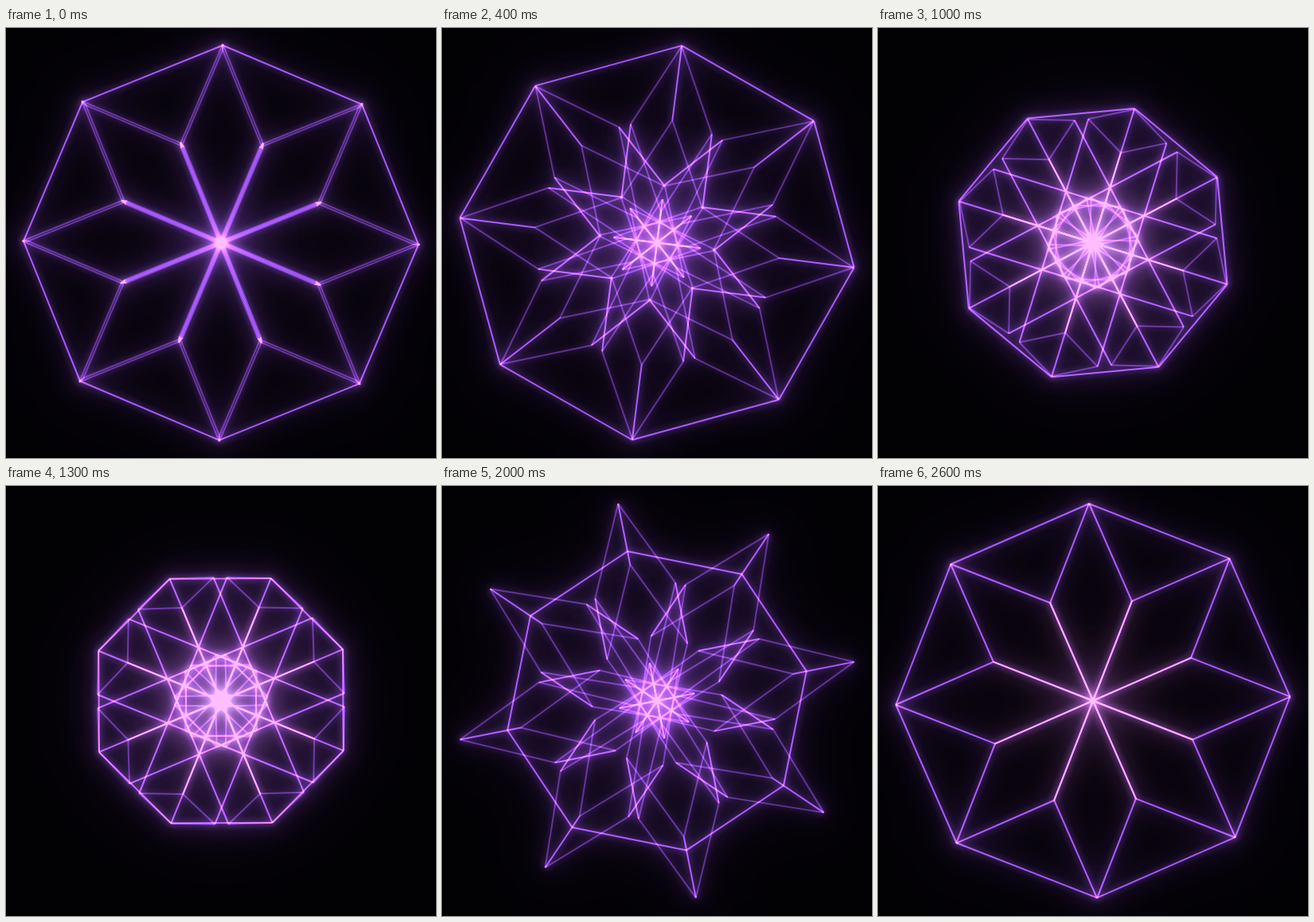
An HTML page with a canvas for the animation above (2.7 s loop, 540 by 540 pixels).

```html
<!DOCTYPE html>
<html lang="en">
<head>
<meta charset="utf-8">
<title>Turning ring</title>
<style>
html, body { margin: 0; width: 100%; height: 100%; overflow: hidden; background: #020104; }
canvas { display: block; }
</style>
</head>
<body>
<canvas id="stage" width="540" height="540"></canvas>
<script>
const LOOP = 2700, STEP = 100, COPIES = 8;
const CX = 270, CY = 269.7;
const REACH = 124, HALF_DEPTH = 88, HALF_WIDTH = REACH * Math.tan(Math.PI / 8);
const RAD = Math.PI / 180;

// [ms, degrees] and [ms, radius]
const TILT = [[0, 2.4], [400, 32.3], [1000, 76.7], [1300, 99.2], [1700, 132.8],
  [2200, 166.2], [2400, 174.5], [2600, 180], [2700, 182.4]];
const RIM = [[0, 248], [200, 253], [400, 249.5], [700, 221], [1000, 176.5],
  [1300, 166], [1700, 170], [2200, 209], [2600, 247.5], [2700, 248]];

const stage = document.getElementById("stage").getContext("2d");
const layer = document.createElement("canvas");
layer.width = layer.height = 540;
const pen = layer.getContext("2d");

// Smooth curve through unevenly spaced keys.
function curve(keys, t) {
  let i = 0;
  while (i < keys.length - 2 && t >= keys[i + 1][0]) i++;
  const slope = k => {
    const a = keys[Math.max(k - 1, 0)], b = keys[Math.min(k + 1, keys.length - 1)];
    return (b[1] - a[1]) / (b[0] - a[0]);
  };
  const [t0, v0] = keys[i], [t1, v1] = keys[i + 1];
  const span = t1 - t0, u = (t - t0) / span, u2 = u * u, u3 = u2 * u;
  return v0 * (2 * u3 - 3 * u2 + 1) + v1 * (3 * u2 - 2 * u3) +
    span * (slope(i) * (u3 - 2 * u2 + u) + slope(i + 1) * (u3 - u2));
}

function line(a, b, alpha) {
  pen.strokeStyle = `rgba(158, 84, 240, ${alpha})`;
  pen.beginPath();
  pen.moveTo(...a);
  pen.lineTo(...b);
  pen.stroke();
}

// A rhombic prism tumbling about a tangential axis, seen from above.
function prism(tilt, place) {
  const c = Math.cos(tilt), s = Math.sin(tilt);
  const middle = REACH - 48 * s - 18 * s ** 4;
  const layers = [1, -1].map(side => {
    const base = middle + side * HALF_DEPTH * s;
    return [
      place(base + REACH * c, 0), place(base, HALF_WIDTH),
      place(base - REACH * c, 0), place(base, -HALF_WIDTH)
    ];
  });
  for (let i = 0; i < 4; i++) {
    for (const ring of layers) line(ring[i], ring[(i + 1) % 4], 0.42);
    line(layers[0][i], layers[1][i], 0.82);
  }
}

function drawLines(t) {
  const tilt = curve(TILT, t) * RAD, rim = curve(RIM, t);
  const spin = (0.5 + 45 * t / LOOP) * RAD;
  pen.globalCompositeOperation = "source-over";
  pen.fillStyle = "#000";
  pen.fillRect(0, 0, 540, 540);
  pen.globalCompositeOperation = "lighter";
  pen.lineWidth = 2;
  pen.lineCap = "butt";
  for (let k = 0; k < COPIES; k++) {
    const angle = spin + k * 2 * Math.PI / COPIES;
    const place = (out, across, turn = angle) => [
      CX + out * Math.sin(turn) + across * Math.cos(turn),
      CY - out * Math.cos(turn) + across * Math.sin(turn)
    ];
    prism(tilt, place);
    line(place(rim, 0), place(rim, 0, angle + 2 * Math.PI / COPIES), 0.82);
  }
}

function glow(blur, strength) {
  stage.filter = `blur(${blur}px) brightness(${strength})`;
  stage.drawImage(layer, 0, 0);
}

function fill(mode, color) {
  stage.filter = "none";
  stage.globalCompositeOperation = mode;
  stage.fillStyle = color;
  stage.fillRect(0, 0, 540, 540);
}

function render(t) {
  drawLines(t);
  fill("source-over", "#020104");
  stage.globalCompositeOperation = "lighter";
  glow(42, 1.2);
  glow(15, 1.3);
  glow(4, 0.9);
  glow(0.5, 1);
  fill("darken", "rgb(255, 190, 255)");
}

const start = performance.now();
let shown = -1;
function tick() {
  const t = Math.floor((performance.now() - start) % LOOP / STEP) * STEP;
  if (t !== shown) render(shown = t);
  requestAnimationFrame(tick);
}
tick();
</script>
</body>
</html>
```
